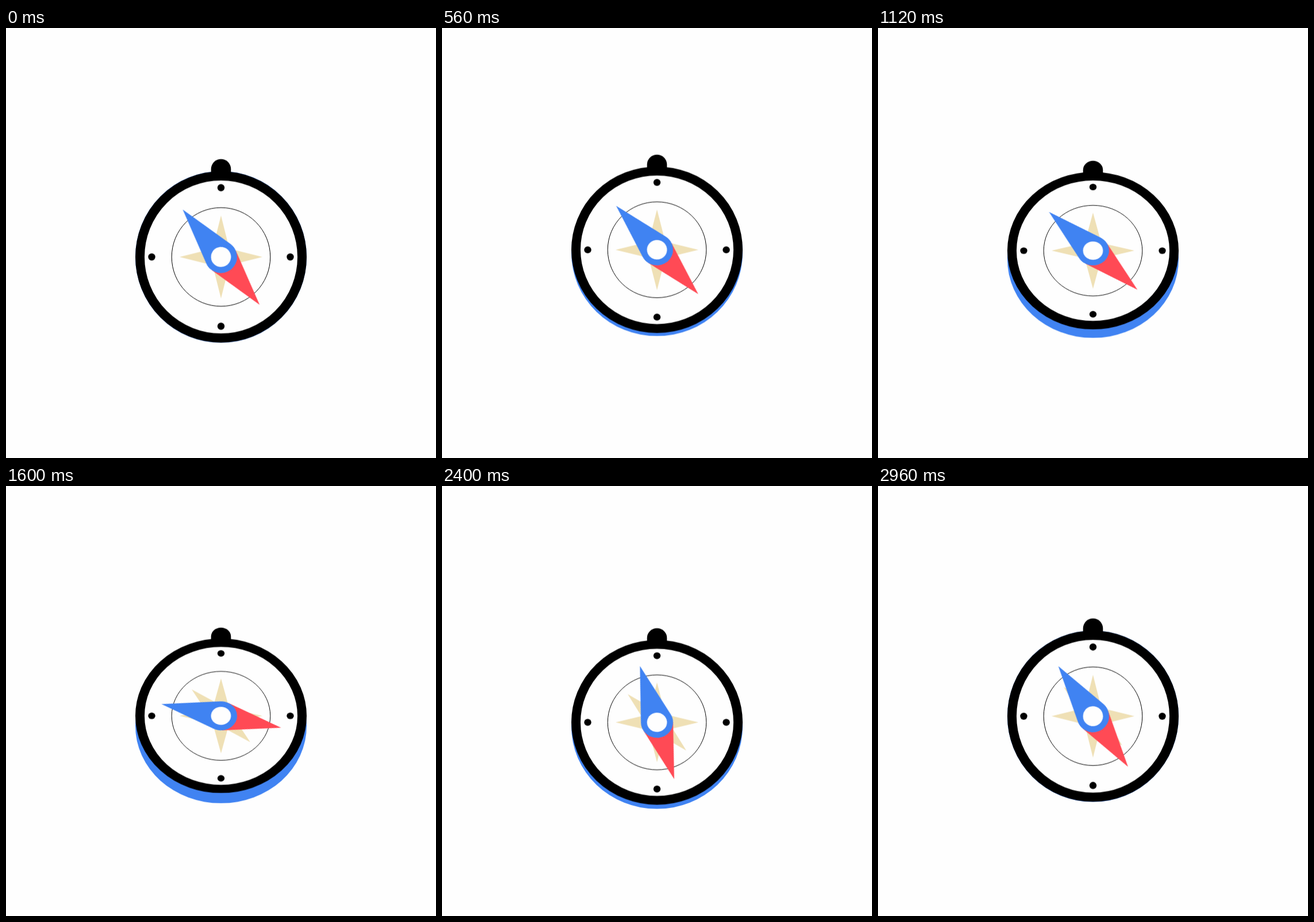
Write an HTML page without scripts that moves like this. It is 748 px wide and 748 px high and loops after 3.04 s.

```html
<!DOCTYPE html>
<html lang="en">
<head>
<meta charset="utf-8">
<title>Compass</title>
<style>
  html, body { margin: 0; width: 100%; height: 100%; overflow: hidden; background: #fefefe; }
  svg { display: block; width: 100%; height: 100%; }

  .bob, .tilt, .base, .needle { animation: 3040ms linear infinite; transform-origin: 0 0; }
  .bob    { animation-name: bob; animation-delay: -2240ms; }
  .tilt   { animation-name: tilt; }
  .base   { animation-name: base; }
  .needle { animation-name: needle; animation-delay: -2760ms; }

  @keyframes bob {
    0%, 100% { transform: translate(374px, 384.2px); animation-timing-function: cubic-bezier(.364, 0, .636, 1); }
    48.36%   { transform: translate(374px, 411.6px); animation-timing-function: cubic-bezier(.364, 0, .636, 1); }
  }
  @keyframes tilt {
    0%, 1.3%, 100% { transform: scaleY(1); animation-timing-function: cubic-bezier(.333, 0, .667, 1); }
    50%            { transform: scaleY(.901); animation-timing-function: cubic-bezier(.333, 0, .667, 1); }
  }
  @keyframes base {
    0%, 1.3%, 100% { transform: translateY(0); animation-timing-function: cubic-bezier(.333, 0, .667, 1); }
    50%            { transform: translateY(19.8px); animation-timing-function: cubic-bezier(.333, 0, .667, 1); }
  }
  /* the needle swings past each rest angle and settles back */
  @keyframes needle {
    0%     { transform: rotate(-47deg); animation-timing-function: cubic-bezier(.333, 0, .667, 1); }
    18.75% { transform: rotate(-37deg); animation-timing-function: cubic-bezier(.333, 0, .667, 1); }
    49.34% { transform: rotate(-82deg); animation-timing-function: cubic-bezier(.333, 0, .667, .24); }
    56.58% { transform: rotate(-70.4deg); animation-timing-function: cubic-bezier(.333, .3, .667, .9); }
    69.74% { transform: rotate(-16.3deg); animation-timing-function: cubic-bezier(.333, .7, .667, 1); }
    72.04% { transform: rotate(-15deg); animation-timing-function: cubic-bezier(.333, 0, .667, 1); }
    100%   { transform: rotate(-47deg); }
  }
</style>
</head>
<body>
<svg viewBox="0 0 748 748">
  <defs>
    <path id="ray" d="M0-72L18 0L0 72L-18 0Z"/>
    <circle id="dot" cy="-120.5" r="6.2"/>
  </defs>
  <g class="bob">
    <g class="tilt">
      <circle class="base" r="149" fill="#4083f2"/>
      <rect x="-17.3" y="-170.2" width="34.6" height="45" rx="17.3"/>
      <circle r="141" fill="#fefefe" stroke="#000" stroke-width="16"/>
      <use href="#dot"/>
      <use href="#dot" transform="rotate(90)"/>
      <use href="#dot" transform="rotate(180)"/>
      <use href="#dot" transform="rotate(270)"/>
      <circle r="85.8" fill="none" stroke="#000"/>
      <g fill="#efe0b5">
        <use href="#ray"/>
        <use href="#ray" transform="rotate(90)"/>
        <use href="#ray" transform="rotate(-45)"/>
      </g>
      <g class="needle">
        <path d="M0 107L27 7.4H-27Z" fill="#ff4a55"/>
        <path d="M0-106L27-7.4A28 28 0 1 1-27-7.4Z" fill="#4083f2"/>
        <circle r="17.4" fill="#fefefe"/>
      </g>
    </g>
  </g>
</svg>
</body>
</html>
```
